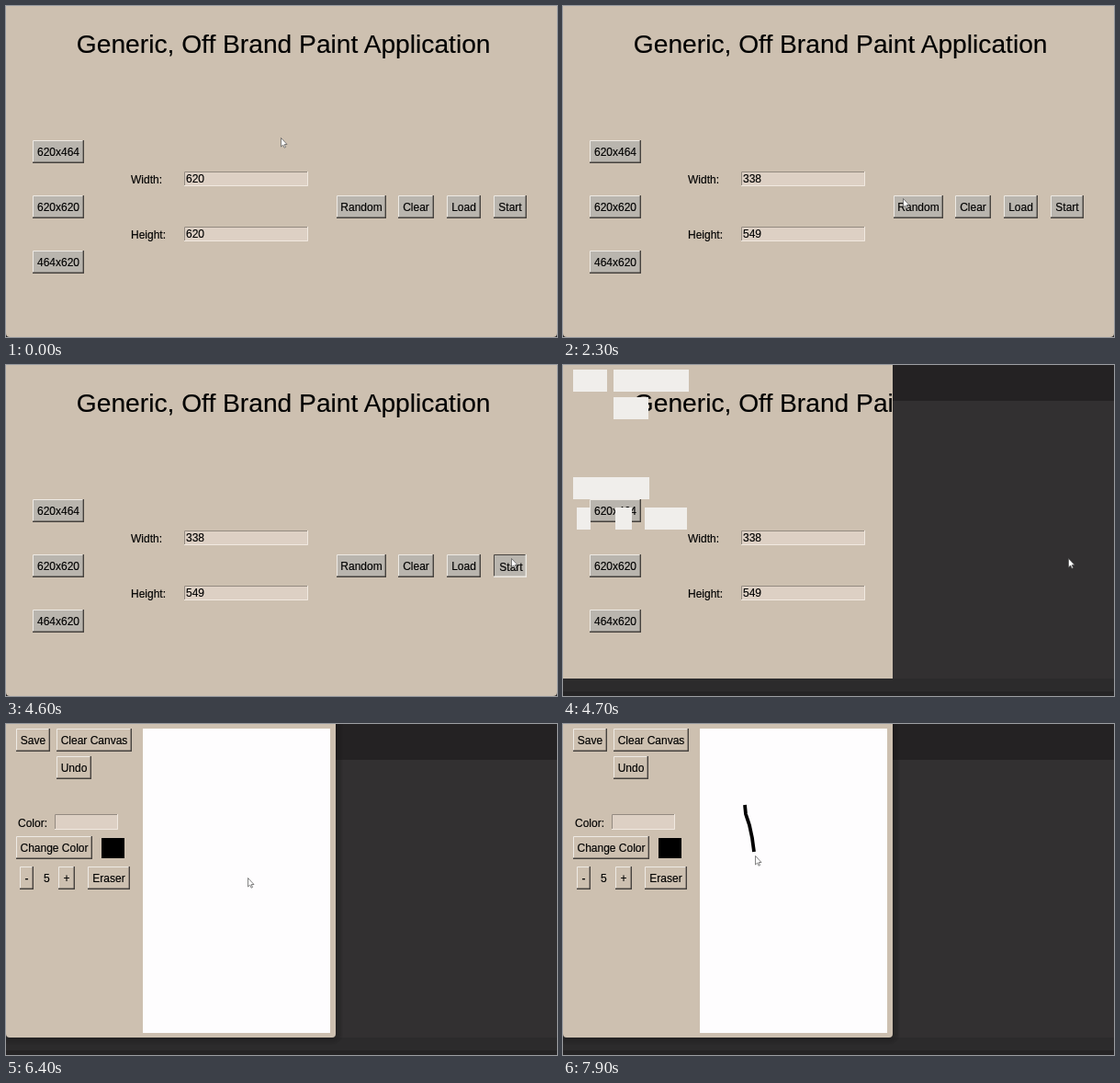
Write an HTML page that moves like this. It is 600 by 360 pixels and loops after 8 s.

```html
<!DOCTYPE html>
<html lang="en">
<head>
<meta charset="utf-8">
<title>Paint application</title>
<style>
html, body { margin: 0; width: 100%; height: 100%; overflow: hidden; background: #323031; }
svg { display: block; width: 600px; height: 360px; }
text { font: 12px "Liberation Sans", Arial, sans-serif; fill: #000; stroke: #000; stroke-width: .15px; white-space: pre; }
.title { font-size: 28.2px; }
</style>
</head>
<body>
<svg id="stage" viewBox="0 0 600 360"></svg>
<script>
const LOOP = 8000, STEP = 100;
const SAND = '#cdc0b0', GREY = '#b9b5ae', FIELD = '#ddd0c4';
const LIGHT_EDGE = '#eeeae4', DARK_EDGE = '#46423e';
const stage = document.getElementById('stage');

function add(parent, tag, attrs = {}, content = '') {
  const node = document.createElementNS('http://www.w3.org/2000/svg', tag);
  for (const key in attrs) node.setAttribute(key, attrs[key]);
  node.textContent = content;
  parent.append(node);
  return node;
}
const group = parent => add(parent, 'g');
const rect = (parent, x, y, width, height, fill, extra = {}) =>
  add(parent, 'rect', { x, y, width, height, fill, ...extra });
const label = (parent, x, y, content, extra = {}) => add(parent, 'text', { x, y, ...extra }, content);
const show = (node, on) => node.setAttribute('visibility', on ? 'inherit' : 'hidden');

function bevel(parent, x, y, w, h, light, dark, lowerWidth = 1) {
  const line = (d, stroke, width) => add(parent, 'path', { d, stroke, fill: 'none', 'stroke-width': width });
  const inset = lowerWidth / 2;
  return [
    line(`M${x + .5} ${y + h - 1}V${y + .5}H${x + w - 1}`, light, 1),
    line(`M${x} ${y + h - inset}H${x + w - inset}V${y}`, dark, lowerWidth)
  ];
}

function button(parent, [x, y, w, h, content], fill) {
  const g = group(parent);
  rect(g, x, y, w, h, fill);
  const [upper, lower] = bevel(g, x, y, w, h, LIGHT_EDGE, DARK_EDGE, 1.4);
  const caption = label(g, x + w / 2, y + 17, content, { 'text-anchor': 'middle' });
  return pressed => {
    upper.setAttribute('stroke', pressed ? DARK_EDGE : LIGHT_EDGE);
    lower.setAttribute('stroke', pressed ? LIGHT_EDGE : DARK_EDGE);
    caption.setAttribute('transform', pressed ? 'translate(1 1)' : '');
  };
}

function field(parent, x, y, w, h) {
  rect(parent, x, y, w, h, FIELD);
  bevel(parent, x, y, w, h, '#938a80', '#f1e9e0');
  return label(parent, x + 2, y + 12, '');
}

// Desktop behind the windows
rect(stage, 0, 0, 600, 360, '#323031');
rect(stage, 0, 0, 600, 39, '#242223');
rect(stage, 0, 341, 600, 19, '#2c2b2c');
rect(stage, 0, 355, 600, 5, '#252425');

// Setup window
const setup = group(stage);
add(setup, 'path', { d: 'M0 0H600V356Q600 360 596 360H4Q0 360 0 356Z', fill: SAND });
label(setup, 76.8, 51, 'Generic, Off Brand Paint Application', { class: 'title' });
[[29, 146, 56, 25, '620x464'], [29, 206, 56, 25, '620x620'], [29, 266, 56, 25, '464x620'],
 [427, 206, 39, 25, 'Clear'], [480, 206, 37, 25, 'Load']].forEach(b => button(setup, b, GREY));
const pressRandom = button(setup, [360, 206, 54, 25, 'Random'], GREY);
const pressStart = button(setup, [531, 206, 36, 25, 'Start'], GREY);
label(setup, 136, 193, 'Width:');
label(setup, 136, 253, 'Height:');
const widthText = field(setup, 194, 180, 135, 16);
const heightText = field(setup, 194, 240, 135, 16);

const paintButtons = [
  [11, 5, 37, 25, 'Save'], [55, 5, 82, 25, 'Clear Canvas'], [55, 35, 38, 25, 'Undo'],
  [11, 122, 83, 25, 'Change Color'], [15, 155, 15, 25, '-'], [57, 155, 18, 25, '+'],
  [89, 155, 46, 25, 'Eraser']
];

// Half-built window shown while it shrinks
const shrinking = group(stage);
rect(shrinking, 359, 0, 241, 39, '#242223');
rect(shrinking, 359, 39, 241, 302, '#323031');
rect(shrinking, 0, 341, 600, 14, '#2c2b2c');
rect(shrinking, 0, 355, 600, 5, '#252425');
paintButtons.forEach(([x, y, w, h]) => rect(shrinking, x, y, w, h - 1, '#f0eeeb'));

// Paint window
const paint = group(stage);
for (let i = 8; i > 0; i--)
  rect(paint, -10, -10, 369 + i, 351 + i, '#000', { rx: 4 + i, opacity: .035 });
rect(paint, -10, -10, 369, 351, SAND, { rx: 4 });
add(paint, 'path', { d: 'M0 337V341H4Q0 341 0 337Z', fill: '#2a292a' });
rect(paint, 149, 5, 204, 331, '#fefdfe');
paintButtons.forEach(b => button(paint, b, SAND));
label(paint, 13, 112, 'Color:');
field(paint, 53, 98, 69, 17);
rect(paint, 104, 124, 25, 22, '#000');
label(paint, 41, 172, '5');
const ink = add(paint, 'polyline', { fill: 'none', stroke: '#000', 'stroke-width': 3.8, 'stroke-linejoin': 'round' });

const cursor = add(stage, 'path', {
  d: 'M.5 .5V10L2.7 8 4.1 11.2 5.5 10.5 4.2 7.5H7Z',
  fill: '#fff', stroke: '#505050', 'stroke-width': .7
});

// time, x, y
const route = [
  [0, 299, 143], [100, 299, 143], [700, 398, 212], [1000, 392, 214], [1800, 380, 211],
  [2300, 370, 209], [2600, 371, 209], [3100, 450, 222], [3500, 536, 232], [3900, 499, 197],
  [4400, 550, 210], [5300, 550, 210], [6200, 265, 168], [6400, 263, 167], [6700, 281, 160],
  [7200, 198, 88], [7400, 199, 98], [7550, 203, 110], [7700, 206, 124], [7850, 208, 139], [7900, 209, 143]
];
// time, width, height
const sizes = [[0, 620, 620], [800, 472, 395], [1200, 591, 268], [1600, 417, 506], [2000, 338, 549]];
const randomPresses = [1200, 1600, 2000];
const INK_START = 7200, INK_LAG = 50;

function pointAt(t) {
  const i = route.findIndex(k => k[0] > t);
  if (i < 0) return route.at(-1).slice(1);
  const [t0, x0, y0] = route[i - 1], [t1, x1, y1] = route[i];
  const p = (t - t0) / (t1 - t0), e = p * p * (3 - 2 * p);
  return [x0 + (x1 - x0) * e, y0 + (y1 - y0) * e];
}

function render(t) {
  const [x, y] = pointAt(t).map(Math.round);
  cursor.setAttribute('transform', `translate(${x} ${y})`);

  const [, w, h] = sizes.findLast(s => s[0] <= t);
  widthText.textContent = w;
  heightText.textContent = h;
  pressRandom(randomPresses.includes(t));
  pressStart(t >= 4500 && t < 4700);

  show(setup, t < 4800);
  show(shrinking, t >= 4700 && t < 4800);
  show(paint, t >= 4800);

  const points = [];
  for (let s = INK_START; s <= t - INK_LAG; s += 50) points.push(pointAt(s).join());
  ink.setAttribute('points', points.join(' '));
}

const start = performance.now();
function tick() {
  const t = (performance.now() - start) % LOOP;
  render(Math.floor(t / STEP) * STEP);
  requestAnimationFrame(tick);
}
tick();
</script>
</body>
</html>
```
